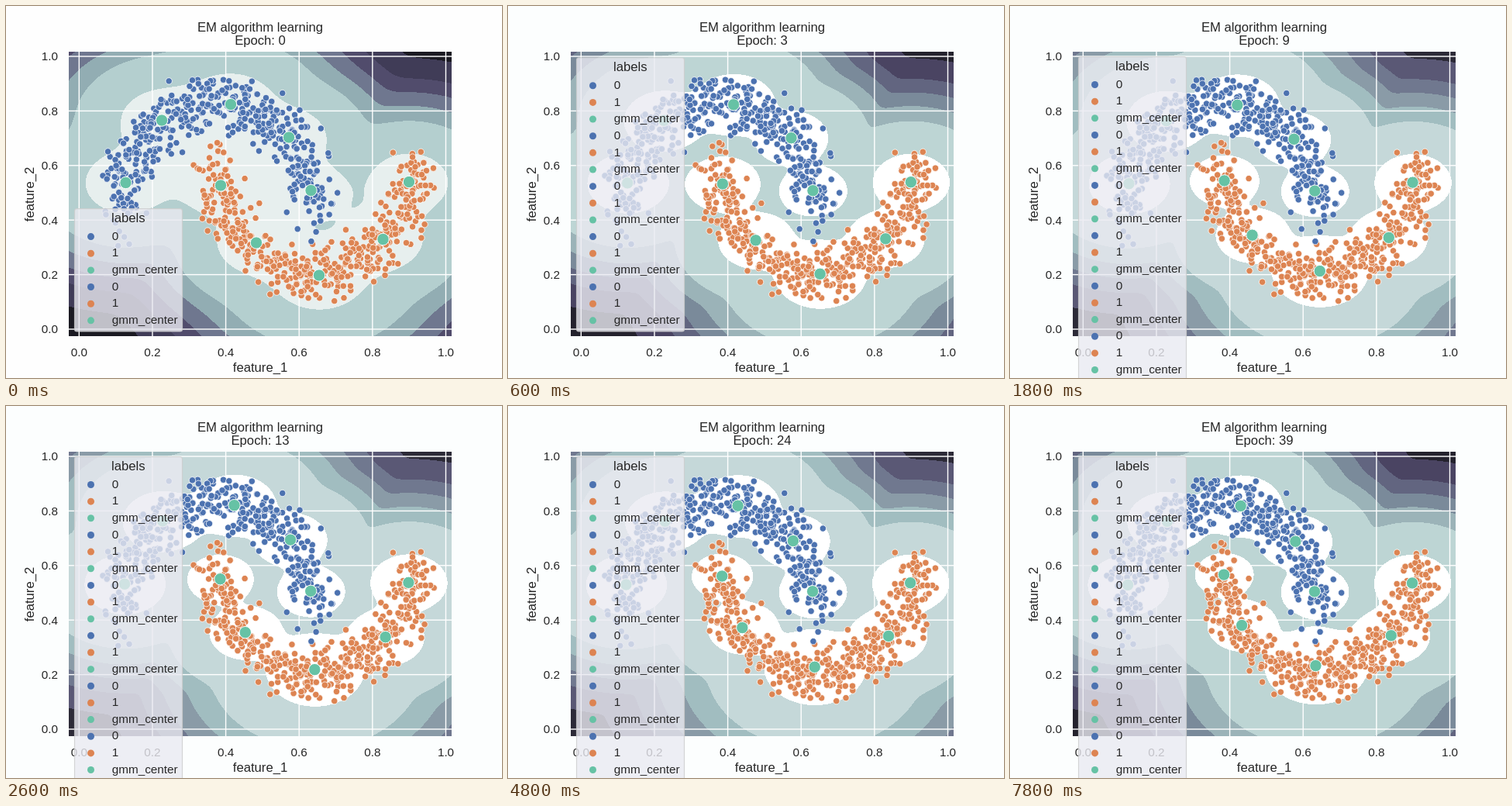
Animation, 640 px wide and 480 px high, one loop 8000 ms. Source, as an HTML page with a canvas:

```html
<!DOCTYPE html>
<html lang="en">
<head>
<meta charset="utf-8">
<title>EM algorithm learning</title>
<style>
  html, body { margin: 0; width: 100%; height: 100%; overflow: hidden; background: #fff; }
  canvas { display: block; width: 640px; height: 480px; }
</style>
</head>
<body>
<canvas id="stage" width="640" height="480"></canvas>
<script>
const ctx = document.getElementById('stage').getContext('2d');
const EPOCHS = 40, EPOCH_MS = 200;
const PLOT = { left: 81, top: 59, width: 494, height: 367 };
const UNIT = { x: 473.2, y: 352 };
const BLUE = '#4c72b0', ORANGE = '#dd8452', GREEN = '#66c2a5', INK = '#262626';
const toX = v => 94.3 + v * UNIT.x;
const toY = v => 417 - v * UNIT.y;
const mix = (a, b, u) => a + (b - a) * u;

// Mixture components: where each starts and settles, and its relative size.
const COMPONENTS = [
  { from: [154.5, 228], to: [152, 231], size: [1.05, 1.05] },
  { from: [201, 147.5], to: [203, 149], size: [1.05, 1.05] },
  { from: [290, 127], to: [298, 129], size: [1.08, 1.08] },
  { from: [365, 169.5], to: [368.5, 175], size: [0.95, 0.95] },
  { from: [393.5, 238], to: [393, 239.5], size: [0.88, 0.88] },
  { from: [277, 231.5], to: [276, 217], size: [1, 0.75] },
  { from: [323, 305.5], to: [298, 282], size: [1, 0.9] },
  { from: [404, 347.5], to: [394, 334.5], size: [1.18, 1.35] },
  { from: [486.5, 301], to: [492, 296], size: [1, 1] },
  { from: [520, 227], to: [519, 228.5], size: [1, 1] }
];

// Colours run from the core outwards; LEVELS are the distances between them.
const LEVELS = [0.105, 0.225, 0.28, 0.33, 0.38, 0.455];
const PALETTES = {
  first: ['#e7efee', '#b4cfcf', '#92adb3', '#6f778f', '#514c6c', '#403c57', '#1b1a22'],
  dark: ['#ffffff', '#bdd5d4', '#9bb3b8', '#7a8a9a', '#626580', '#4a4462', '#24222d'],
  pale: ['#ffffff', '#c5d8d9', '#a1bdc0', '#8a9ba7', '#70788f', '#5a5875', '#2c2a37']
};

function lookAt(epoch) {
  if (epoch === 0) return { colors: PALETTES.first, sigma: 0.075, paper: '#fefefe' };
  const pale = epoch >= 8 && epoch < 28;
  return { colors: pale ? PALETTES.pale : PALETTES.dark, sigma: 0.05, paper: '#fcfefe' };
}

function mixtureAt(epoch) {
  const u = 1 - Math.exp(-Math.pow(epoch / 15, 1.2));
  return COMPONENTS.map(({ from, to, size }) => ({
    x: mix(from[0], to[0], u),
    y: mix(from[1], to[1], u),
    size: mix(size[0], size[1], u)
  }));
}

function randomFrom(seed) {
  return () => {
    seed = (seed * 1664525 + 1013904223) >>> 0;
    return (seed + 0.5) / 4294967296;
  };
}

// Two interleaving half moons with Gaussian noise.
function makeDots(count = 470, noise = 0.13, reach = 2.6) {
  const random = randomFrom(42), dots = [];
  const gaussianRadius = () => {
    let r;
    do r = Math.sqrt(-2 * Math.log(random())); while (r > reach);
    return r * noise;
  };
  for (let i = 0; i < count; i++) {
    const t = Math.PI * ((i * 0.618034) % 1);
    for (const color of [BLUE, ORANGE]) {
      const upper = color === BLUE;
      const radius = gaussianRadius(), turn = random() * 2 * Math.PI;
      const x = (upper ? Math.cos(t) : 1 - Math.cos(t)) + radius * Math.cos(turn);
      const y = (upper ? Math.sin(t) : 0.5 - Math.sin(t)) + radius * Math.sin(turn);
      dots.push([273 + 125 * x, 272 - 147 * y, color]);
    }
  }
  return dots;
}
const DOTS = makeDots();

function disc(x, y, r, color, edge = 0) {
  ctx.beginPath();
  ctx.arc(x, y, r, 0, 2 * Math.PI);
  ctx.fillStyle = color;
  ctx.fill();
  if (edge) {
    ctx.strokeStyle = '#fff';
    ctx.lineWidth = edge;
    ctx.stroke();
  }
}

function text(label, x, y, size, align = 'center') {
  ctx.font = `${size}px "Liberation Sans", Arial, sans-serif`;
  ctx.textAlign = align;
  ctx.fillStyle = INK;
  ctx.fillText(label, x, y);
}

// Filled contours of the negative log-likelihood, expressed as a distance.
function drawContours(mixture, { colors, sigma }) {
  const image = ctx.createImageData(PLOT.width, PLOT.height);
  const pixels = new Uint32Array(image.data.buffer);
  const packed = colors.map(c => {
    const n = parseInt(c.slice(1), 16);
    return (0xff000000 | (n & 255) << 16 | (n & 0xff00) | n >> 16) >>> 0;
  });
  const spread = 2 * sigma * sigma;
  const cuts = LEVELS.map(r => Math.exp(-r * r / spread));
  for (let row = 0, p = 0; row < PLOT.height; row++) {
    for (let col = 0; col < PLOT.width; col++, p++) {
      let density = 0;
      for (const { x, y, size } of mixture) {
        const dx = (col + PLOT.left - x) / UNIT.x, dy = (row + PLOT.top - y) / UNIT.y;
        density += Math.exp(-(dx * dx + dy * dy) / (spread * size * size));
      }
      let band = 0;
      while (band < cuts.length && density < cuts[band]) band++;
      pixels[p] = packed[band];
    }
  }
  ctx.putImageData(image, PLOT.left, PLOT.top);
}

function drawAxes() {
  for (let i = 0; i <= 5; i++) {
    const x = toX(i / 5), y = toY(i / 5), label = (i / 5).toFixed(1);
    ctx.fillStyle = '#fff';
    ctx.fillRect(x - 0.7, PLOT.top, 1.4, PLOT.height);
    ctx.fillRect(PLOT.left, y - 0.7, PLOT.width, 1.4);
    text(label, x, 451.5, 15.28);
    text(label, 67, y + 5.3, 15.28, 'right');
  }
  text('feature_1', 328, 472, 16.67);
  ctx.save();
  ctx.translate(36, 243);
  ctx.rotate(-Math.PI / 2);
  text('feature_2', 0, 0, 16.67);
  ctx.restore();
}

// Every epoch adds one more group of three entries.
function drawLegend(epoch) {
  const entries = 3 * (epoch + 2), step = 21.65;
  const height = 28.5 + entries * step;
  const top = Math.max(65.5, 420 - height);
  ctx.beginPath();
  ctx.roundRect(88.5, top, 139, height, 3);
  ctx.fillStyle = 'rgba(234,234,242,.8)';
  ctx.fill();
  ctx.strokeStyle = 'rgba(204,204,204,.8)';
  ctx.lineWidth = 1.2;
  ctx.stroke();
  text('labels', 157.7, top + 17.7, 16.67);
  const kinds = [['0', BLUE], ['1', ORANGE], ['gmm_center', GREEN]];
  for (let i = 0; i < entries; i++) {
    const y = top + 36 + i * step;
    if (y > 500) break;
    const [label, color] = kinds[i % 3];
    disc(109.5, y, 4.5, color);
    text(label, 136.8, y + 4.2, 15.28, 'left');
  }
}

function draw(epoch) {
  const look = lookAt(epoch), mixture = mixtureAt(epoch);
  ctx.fillStyle = look.paper;
  ctx.fillRect(0, 0, 640, 480);
  drawContours(mixture, look);
  drawAxes();
  for (const [x, y, color] of DOTS) disc(x, y, 4.2, color, 0.8);
  for (const { x, y } of mixture) disc(x, y, 7.7, GREEN, 1);
  text('EM algorithm learning', 328, 32.5, 16.67);
  text('Epoch: ' + epoch, 328, 49.5, 16.67);
  drawLegend(epoch);
}

let shown = -1, start;
function tick(now) {
  start ??= now;
  const epoch = Math.floor(Math.max(0, now - start) / EPOCH_MS) % EPOCHS;
  if (epoch !== shown) draw(shown = epoch);
  requestAnimationFrame(tick);
}
draw(0);
requestAnimationFrame(tick);
</script>
</body>
</html>
```
